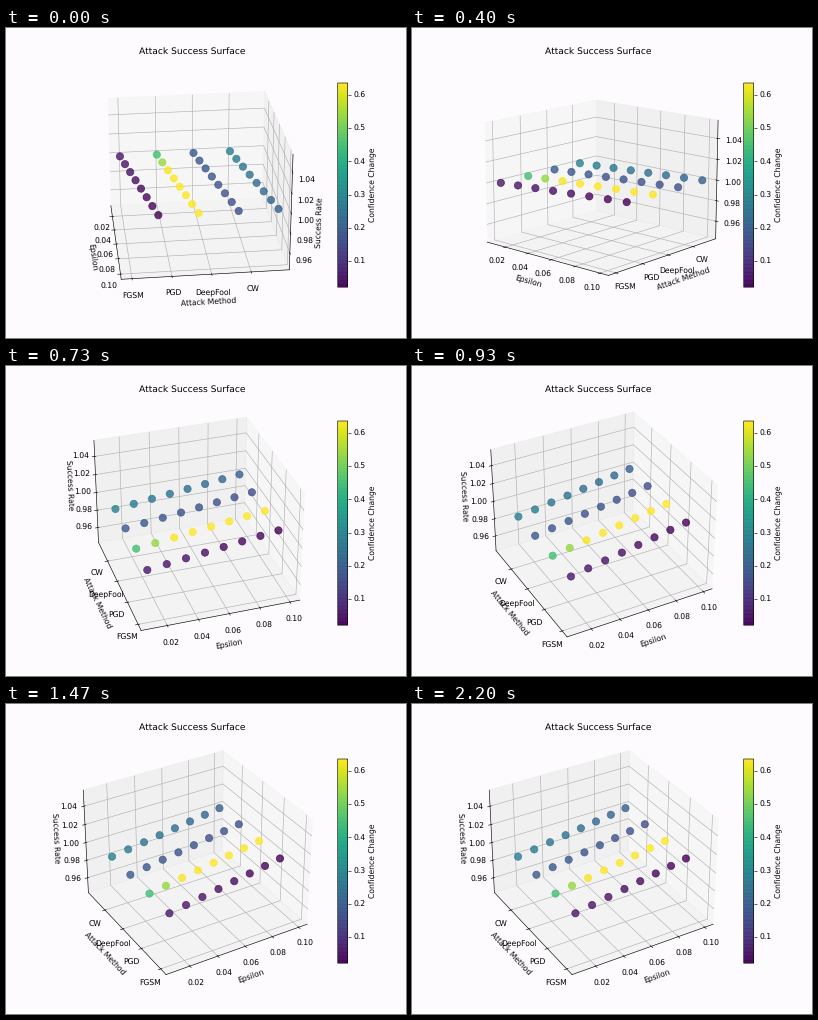
A matplotlib script that plays this animation: 400x310 px, repeating every 2.27 s.

```python
import matplotlib.pyplot as plt
import numpy as np
from matplotlib.animation import FuncAnimation

W, H, DPI = 400, 310, 55
LOOP_MS = 2270
SUB = 3                 # ticks per visible step
FRAMES = 34 * SUB
PAPER = "#fdfbfe"

METHODS = ["FGSM", "PGD", "DeepFool", "CW"]
EPS = np.linspace(0.01, 0.10, 8)

# Camera drag: step, azimuth, its speed, elevation, its speed
KEYS = [
    (0, -6.7, -5.0, 24.8, -2.2),
    (6, -48.0, -10.5, 13.9, 1.5),
    (9, -91.6, -11.0, 28.5, 2.2),
    (14, -118.2, -2.0, 33.7, -0.2),
    (16, -120.7, 0.0, 32.4, 0.0),
]

# Soft, unsnapped rendering of glyphs and lines
plt.rcParams.update({"text.hinting": "none", "path.snap": False})


def hermite(u, span, p0, v0, p1, v1):
    return ((2 * u**3 - 3 * u**2 + 1) * p0 + (u**3 - 2 * u**2 + u) * span * v0
            + (3 * u**2 - 2 * u**3) * p1 + (u**3 - u**2) * span * v1)


def camera(step):
    """Return (elev, azim) of the view at a step; it rests after the last key."""
    step = min(step, KEYS[-1][0])
    for a, b in zip(KEYS, KEYS[1:]):
        if step <= b[0]:
            span = b[0] - a[0]
            u = (step - a[0]) / span
            azim = hermite(u, span, a[1], a[2], b[1], b[2])
            elev = hermite(u, span, a[3], a[4], b[3], b[4])
            return elev, azim


def px_box(x, y, w, h):
    """Pixel box with top-left origin as figure fractions."""
    return [x / W, 1 - (y + h) / H, w / W, h / H]


confidence = np.array([
    np.linspace(0.060, 0.022, 8),
    np.minimum(0.636, 0.45 + 0.09 * np.arange(8)),
    np.linspace(0.190, 0.165, 8),
    np.linspace(0.285, 0.205, 8),
])
eps = np.tile(EPS, len(METHODS))
pos = (np.arange(len(METHODS))[:, None] + 0.1 * np.arange(8)).ravel()
rate = np.ones_like(eps)

# the small excess keeps the canvas from rounding down a pixel
fig = plt.figure(figsize=((W + 0.001) / DPI, (H + 0.001) / DPI), dpi=DPI,
                 facecolor=PAPER)
ax = fig.add_axes(px_box(59.5, 30, 254, 254), projection="3d",
                  facecolor=PAPER)
points = ax.scatter(eps, pos, rate, c=confidence.ravel(), cmap="viridis",
                    s=90, alpha=0.8, depthshade=False)

ax.set_title("Attack Success Surface")
ax.set_xlabel("Epsilon")
ax.set_ylabel("Attack Method")
ax.set_zlabel("Success Rate")
ax.set_yticks(range(len(METHODS)))
ax.set_yticklabels(METHODS)
ax.tick_params(pad=4.2)

cax = fig.add_axes(px_box(331.7, 55, 10, 204.2))
fig.colorbar(points, cax=cax, label="Confidence Change")


def update(n):
    elev, azim = camera((n + 1) // SUB)
    ax.view_init(elev=elev, azim=azim)
    return (points,)


anim = FuncAnimation(fig, update, frames=FRAMES, interval=LOOP_MS / FRAMES,
                     init_func=lambda: update(0), repeat=True, repeat_delay=0,
                     blit=False)
plt.show()
```
